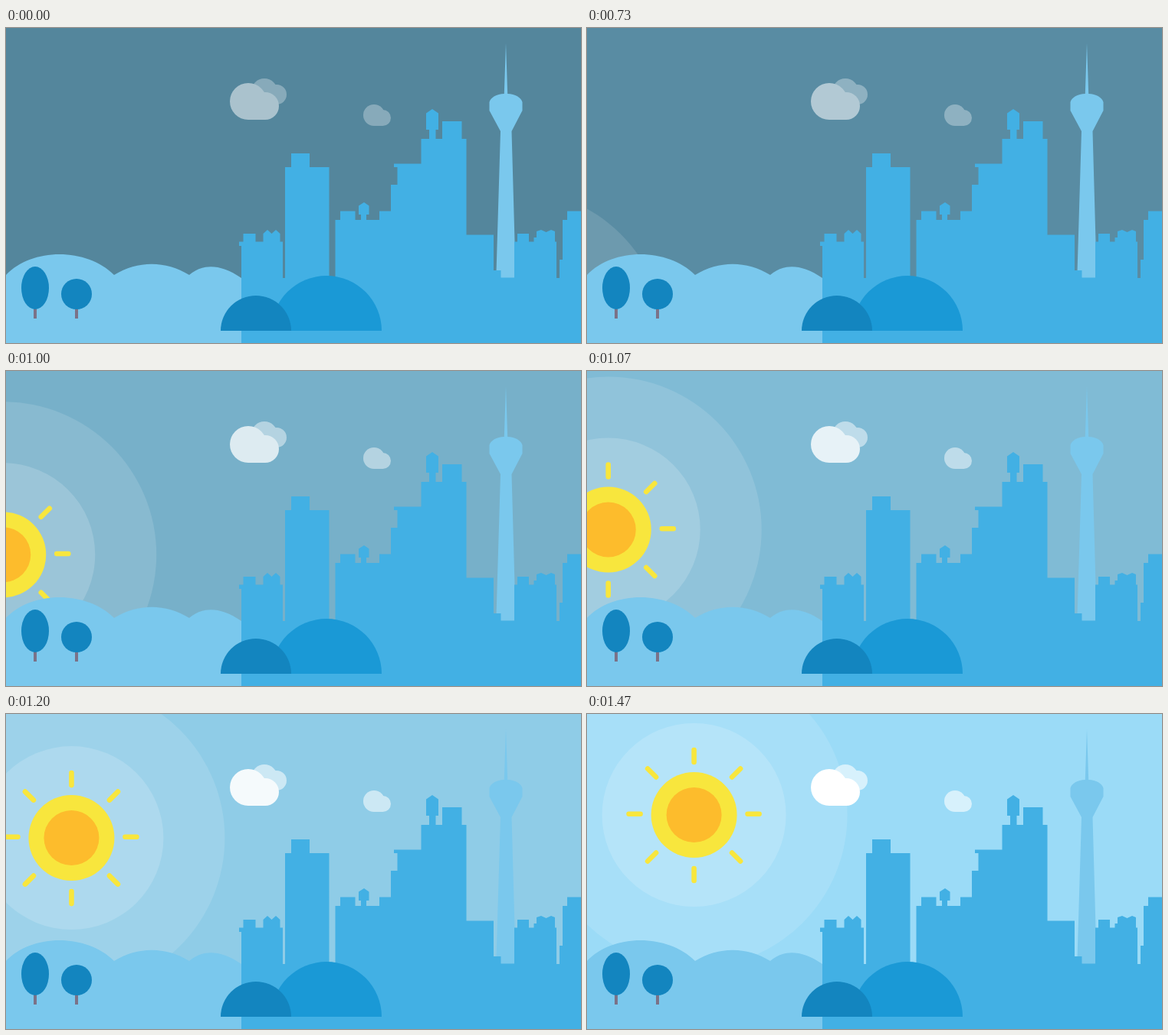
Animation, 750 px wide and 412 px high, one loop 1530 ms. Source, as an HTML page:

```html
<!DOCTYPE html>
<html lang="en">
<head>
<meta charset="utf-8">
<title>Sunrise over the city</title>
<style>
  html, body { margin: 0; width: 100%; height: 100%; overflow: hidden; }
  svg { display: block; width: 750px; height: 412px; }
</style>
</head>
<body>
<svg viewBox="0 0 750 412">
  <rect id="sky" width="750" height="412" fill="#54869c"/>

  <g id="sun">
    <circle r="200" fill="#fff" opacity=".12"/>
    <circle r="120" fill="#fff" opacity=".16"/>
    <circle r="56" fill="#f8e63d"/>
    <circle r="36" fill="#fdbc2c"/>
    <path stroke="#f8e63d" stroke-width="6.6" stroke-linecap="round"
      d="M0-85v16M0 70v16M70-1.3h15M-70-1.3h-15M49.5-49.5l11-11M-49.5-49.5l-11-11M49.5 49.5l11 11M-49.5 49.5l-11 11"/>
  </g>

  <g id="clouds" fill="#fff">
    <g opacity=".6">
      <circle cx="337" cy="83" r="17"/>
      <circle cx="353" cy="87" r="13"/>
      <path d="M337 87h16v13h-16z"/>
    </g>
    <circle cx="316" cy="96" r="24"/>
    <circle cx="338" cy="102" r="18"/>
    <path d="M316 102h22v18h-22z"/>
    <g opacity=".6">
      <circle cx="480" cy="114" r="14"/>
      <circle cx="491.5" cy="117.5" r="10.5"/>
      <path d="M480 117h11.5v11h-11.5z"/>
    </g>
  </g>

  <g fill="#7ac8ed">
    <path d="M0 323C34 287 105 287 141 323C172 304 208 304 239 323C255 309 278 307 307 327V412H0z"/>
    <path d="M649.8 86L652 20L654.2 86C664 86 672 91 673.5 97V108L659.5 135L663.5 279V327H639.3L645 135L630.5 108V97C632 91 640 86 649.8 86z"/>
  </g>

  <path fill="#42b0e4" d="M307 412V285H304V279.5H309.5V269H325.5V279.5H335.5V269L341 264L346.5 269L352 264L357.5 269V279.5H361V327H364V182H372V164H396V182H421.5V327
    H429.5V251H436V239.5H455.5V251H463V244H460V232.5L467 228L473.5 232.5V244H470V251H487V239.5H502V205H510.5V182H506V177.5H541.5V145H552V133H548V111.5L556 106L564 111.5V133H560.5V145H569V122H594.5V145H600.5V270.5H636V317H645.5V326.5
    H663V279.5H667V269H682V279.5H688.5V274H692V266L698 264L704.5 267L711 264L716 266V279.5H718V327H722V303H726V251H732V239.5H750V412z"/>

  <path fill="#1a99d6" d="M346 396a72 72 0 0 1 144 0z"/>
  <path fill="#1385bf" d="M280 396a46 46 0 0 1 92 0z"/>

  <path fill="#7b7288" d="M36 364h4v16h-4zM90 364h4v16h-4z"/>
  <g fill="#1385bf">
    <ellipse cx="38" cy="340" rx="18" ry="28"/>
    <circle cx="92" cy="348" r="20"/>
  </g>
</svg>
<script>
  const LOOP = 1530, HOLD = 600, STEP = 1000 / 15;
  const NIGHT = [84, 134, 156], DAY = [155, 219, 247];
  const [sky, sun, clouds] = ['sky', 'sun', 'clouds'].map(id => document.getElementById(id));

  // cubic-bezier(.395, 0, .514, 1), solved by bisection
  function ease(x) {
    let lo = 0, hi = 1, s;
    for (let i = 0; i < 24; i++) {
      s = (lo + hi) / 2;
      const at = 1.185 * s * (1 - s) ** 2 + 1.542 * s * s * (1 - s) + s ** 3;
      if (at < x) lo = s; else hi = s;
    }
    return s * s * (3 - 2 * s);
  }

  function draw() {
    const t = performance.now() % LOOP;
    // the sunrise advances at 15 steps per second
    const step = Math.floor((t - HOLD + 4) / STEP);
    const p = step < 0 ? 0 : ease(Math.min(1, (step + .5) / 14));
    const q = 1 - p;

    const x = 140.2 - 330 * q + 87 * q * q - 17 * q ** 12;
    const y = 131.7 + 153 * q + 125 * q * q + 79 * q ** 12;
    sun.setAttribute('transform', `translate(${x} ${y})`);
    sun.setAttribute('visibility', step < 1 ? 'hidden' : 'visible');
    clouds.setAttribute('opacity', .5 + p / 2);
    sky.setAttribute('fill', `rgb(${NIGHT.map((c, i) => Math.round(c + (DAY[i] - c) * p))})`);
    requestAnimationFrame(draw);
  }
  draw();
</script>
</body>
</html>
```
